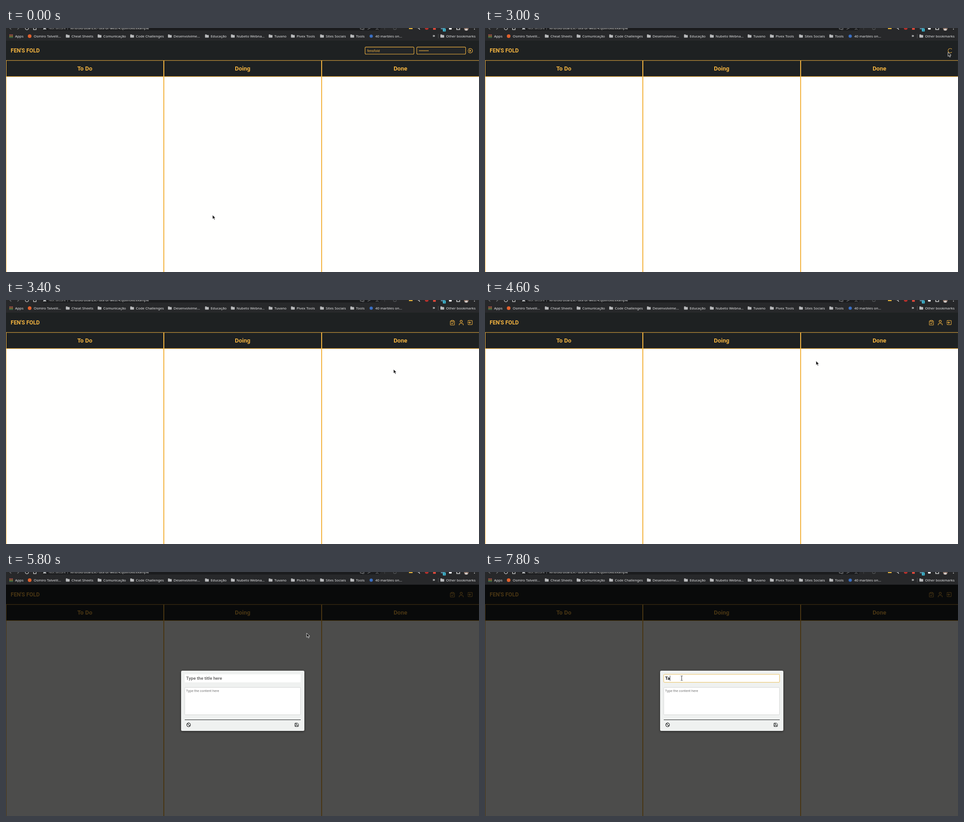
These frames come from a looping animation (1040 by 539 pixels, 8000 ms). An HTML page:

```html
<!DOCTYPE html>
<html lang="en">
<head>
<meta charset="utf-8">
<title>Task board</title>
<style>
html, body { margin: 0; width: 100%; height: 100%; overflow: hidden; background: #fff; }
svg { display: block; width: 100vw; height: 100vh; }
text { font-family: Roboto, sans-serif; white-space: pre; }
.bar text { font: 7.85px "Noto Sans", sans-serif; fill: #e6e7e8; }
.bar .url { font-size: 7.35px; }
.head { font-weight: 700; font-size: 13px; fill: #f2b340; }
.line { fill: none; stroke: #f2b340; stroke-width: 1.08; stroke-linecap: round; stroke-linejoin: round; }
.ink { fill: none; stroke: #1c1e1f; stroke-width: 1; stroke-linejoin: round; }
</style>
</head>
<body>
<svg id="stage" viewBox="0 0 1040 539"></svg>
<script>
const LOOP = 8000, STEP = 200;
const GOLD = '#f2b340', DARK = '#1e2122';
const stage = document.getElementById('stage');

const rect = (x, y, w, h, fill, extra = '') =>
  `<rect x="${x}" y="${y}" width="${w}" height="${h}" fill="${fill}" ${extra}/>`;
const dot = (x, y, r, fill) => `<circle cx="${x}" cy="${y}" r="${r}" fill="${fill}"/>`;
const text = (x, y, s, extra = '') => `<text x="${x}" y="${y}" ${extra}>${s}</text>`;
const path = (d, extra = '') => `<path d="${d}" ${extra}/>`;
const group = (id, body, extra = '') => `<g id="${id}" ${extra}>${body}</g>`;

// Arc around a centre, angles in degrees
function arc(cx, cy, r, from, to) {
  const at = a => `${cx + r * Math.cos(a * Math.PI / 180)} ${cy + r * Math.sin(a * Math.PI / 180)}`;
  return `M${at(from)}A${r} ${r} 0 ${to - from > 180 ? 1 : 0} 1 ${at(to)}`;
}

const folder = x => path(`M${x} 15.2q0-.9.9-.9h2.3l1 1.1h3.3q.8 0 .8.8v4.2q0 .8-.8.8h-6.7q-.8 0-.8-.8z`, 'fill="#b9babc"');

function browserBar() {
  const folders = [
    [144, 'Cheat Sheets'], [214, 'Comunicação'], [285.5, 'Code Challenges'],
    [368.5, 'Desenvolvime…'], [450, 'Educação'], [507, 'Nubeto Webna…'],
    [590, 'Tuvano'], [639, 'Pivex Tools'], [703, 'Sites Sociais'],
    [769.5, 'Tools'], [967.5, 'Other bookmarks']
  ];
  const colors = ['#e06055', '#e8b33f', '#58a55c'];
  let s = rect(0, 0, 1040, 28, '#27282a');
  s += rect(78, -10, 746, 15.5, '#1b1c1e', 'rx="7"');
  s += `<g fill="none" stroke="#d4d5d6" stroke-width="1.2">
    <path d="M8 0l3.5 3.3M25 3.3L28.5 0" stroke="#77797b"/>
    <path d="${arc(46, .2, 3.7, 0, 180)}M60.5-1v4.7h5.8V-1"/>
    <path d="M779-1v3.5h5M784 0h3v3.5h-4M795 3l7-3.5M813 3.5l3-1.8 3 1.8" stroke="#8b8d90" stroke-width="1"/>
    <path d="${arc(855, 0, 3.5, 10, 170)}" stroke="#55585a"/>
    <path d="M904 0l2-1 4 4.5M991-2v5.5h6.5V-2" stroke-width="1.5"/></g>`;
  s += path('M81 3.2L85-4l4 7.2z', 'fill="#b0b2b4"') + rect(135, 0, .8, 4, '#77797b');
  s += text(94, 3, 'Not secure', 'class="url" style="fill:#a6a8aa"');
  s += text(141, 3, 'fensfold-board.k7-site-br-west-4.quilnova.example', 'class="url"');
  s += rect(832, 0, .8, 4, '#4b4d50') + rect(886, -2, 8, 4.4, '#e3b13b') + dot(925, 0, 4, '#b3302c');
  s += rect(939, -2, 6, 6, '#d9483a') + rect(956, -2, 8, 5, '#53788d') + rect(960.5, 1, 6.5, 6.7, '#3fb6cf', 'rx="1"');
  s += text(962.6, 6.6, '1', 'style="font-size:5.5px;fill:#123"');
  s += rect(974, -2, 6, 5.5, '#eee', 'rx="1"') + dot(1012, 1, 5, '#8d7468') + path('M1008 4q4-5 8 0q-4 3-8 0z', 'fill="#d8d4d2"') + dot(1030, 2.6, 1, '#ddd');
  for (let i = 0; i < 9; i++)
    s += rect(7.5 + i % 3 * 2.8, 14.2 + (i / 3 | 0) * 2.8, 1.8, 1.8, colors[i / 3 | 0]);
  s += text(20, 20.5, 'Apps') + dot(52, 18, 4, '#e2612d') + text(61, 20.5, 'Osmiro Talvelil…');
  for (const [x, name] of folders) s += folder(x - 12.4) + text(x, 20.5, name);
  s += dot(803, 18, 3.6, '#3a6fc4') + text(812, 20.5, '40 marbles on…');
  s += text(938, 20.4, '»', 'style="font-weight:700;font-size:9px"') + rect(950, 13, .8, 10, '#55575a');
  return group('bar', s, 'class="bar"');
}

function board() {
  let s = rect(0, 28, 1040, 80, DARK) + text(10.3, 53.8, 'FEN\'S FOLD', 'class="head" style="font-size:12.1px"');
  ['To Do', 'Doing', 'Done'].forEach((name, i) => {
    const x = i * 347;
    s += rect(x + .5, 71.7, 346, 480, 'none', 'class="line"');
    s += path(`M${x} 107.4h347`, 'class="line"');
    s += text(x + 173.2, 94, name, 'class="head" text-anchor="middle"');
  });
  return s;
}

function loginForm() {
  let s = rect(789.5, 42.1, 107.5, 15.7, '#222527', 'class="line" rx="2" style="fill:#222527"');
  s += rect(903.1, 42.1, 107.5, 15.7, '#222527', 'class="line" rx="2" style="fill:#222527"');
  s += text(794, 52.6, 'fensfold', `font-size="7.6" fill="${GOLD}"`);
  for (let i = 0; i < 8; i++) s += dot(909.2 + i * 2.7, 50.2, 1.05, GOLD);
  s += path(arc(1020.8, 50.2, 4.9, -150, 150) + 'M1015.3 50.2h6.5M1019.6 47.9l2.3 2.3-2.3 2.3', 'class="line"');
  return group('login', s);
}

const userMenu = () => group('menu', path(
  'M979 46.2h-1.2q-.8 0-.8.8v7.5q0 .8.8.8h7.4q.8 0 .8-.8V47q0-.8-.8-.8H984' +
  'M979.3 45h4.4v2.2h-4.4zM979.4 51l1.6 1.6 2.8-2.9' +
  'M996.4 55.3v-.9q0-2.7 3-2.7h3q3 0 3 2.7v.9' +
  'M1016 47.6v-1.4q0-.9.9-.9h7.3q.9 0 .9.9v7.4q0 .9-.9.9h-7.3q-.9 0-.9-.9v-1.4' +
  'M1015 49.9h6.3M1019.2 47.8l2.1 2.1-2.1 2.1', 'class="line"') +
  '<circle cx="1000.9" cy="47.3" r="2.4" class="line"/>');

function loader() {
  const ring = (r, turn, color) => path(
    arc(520.3, 284.6, r, turn, turn + 90) + arc(520.3, 284.6, r, turn + 180, turn + 270),
    `fill="none" stroke="${color}" stroke-width="6.4" stroke-linecap="round"`);
  return group('loader', ring(28.4, -82, GOLD) + ring(20.6, -6, '#222324'));
}

function dialog() {
  let s = rect(385, 218, 271, 133, '#eff1f0', 'rx="3" filter="url(#shade)"');
  s += rect(393, 226, 254.7, 17.7, '#fff', 'id="field" rx="1.5"');
  s += rect(393, 255, 254.7, 60.4, '#fff', 'rx="1.5" stroke="#cfd1d0" stroke-width=".9"');
  s += text(396, 238.3, '', 'id="title" font-size="9.75" font-weight="700"');
  s += rect(396, 229, .8, 11.5, '#111', 'id="caret"');
  s += text(395.8, 264.8, 'Type the content here', 'font-size="7.58" fill="#757575"');
  s += path('M393 326.5h255', 'class="ink"');
  s += path(arc(401.5, 337.6, 4.1, 0, 359.9) + 'zM398.6 334.7l5.8 5.8', 'class="ink" style="stroke-width:1.15"');
  s += path('M635.2 334.6q0-.8.8-.8h5l2 2v4.8q0 .8-.8.8H636q-.8 0-.8-.8zM637 341.2v-3h4.2v3M637 334v1.9h3', 'class="ink"');
  return group('dialog', s);
}

const pointers =
  path('M0 0v9.2l2.2-1.9 1.6 3.5 1.7-.8-1.6-3.3h3z', 'id="arrow" fill="#151515" stroke="#fff" stroke-width=".8" stroke-linejoin="round"') +
  path('M0 .6q1-1.2 1.8.2v3.4l4 .7q1 .3.9 1.4l-.6 3.9H1.7L-1 6.6q0-1.2 1-.8z', 'id="hand" fill="#fff" stroke="#222" stroke-width=".6" stroke-linejoin="round"') +
  path('M-2-5h1.4L0-4.4.6-5H2M0-4.4v8.8M-2 5h1.4L0 4.4.6 5H2', 'id="beam" fill="none" stroke="#222" stroke-width=".9"');

stage.innerHTML = `<defs><filter id="shade" x="-10%" y="-10%" width="120%" height="125%">
  <feDropShadow dx="0" dy="1.5" stdDeviation="2.5" flood-opacity=".5"/></filter></defs>` +
  rect(0, 0, 1040, 539, '#fffffe') + board() + loginForm() + userMenu() +
  path(arc(1022.9, 50, 4.7, 48, 312), 'id="spinner" class="line"') +
  rect(0, 28, 1040, 511, '#000', 'id="dim"') + browserBar() + loader() + dialog() + group('pointer', pointers);

const el = {};
stage.querySelectorAll('[id]').forEach(n => el[n.id] = n);
const show = (id, on) => el[id].style.display = on ? '' : 'none';

// Pointer stops: time, x, y
const route = [
  [0, 454, 413], [200, 454, 413], [1200, 1029, 57], [1400, 1017, 50], [1600, 1014, 50],
  [1800, 978, 50], [2200, 1018, 53.5], [3200, 1018, 53.5], [3400, 852, 153], [3600, 640, 205],
  [4000, 196, 266], [4200, 190, 262], [4800, 916, 90], [5400, 980, 49], [5600, 981.5, 48.5],
  [5800, 661, 135], [6000, 530, 217], [6200, 445, 258], [6400, 432.5, 234.5], [LOOP, 432.5, 234.5]
];

function pointerAt(t) {
  const i = route.findIndex(p => p[0] > t), a = route[i - 1], b = route[i];
  const u = (t - a[0]) / (b[0] - a[0]), k = u * u * (3 - 2 * u);
  return [a[1] + (b[1] - a[1]) * k, a[2] + (b[2] - a[2]) * k];
}

function pointerKind(t, x) {
  if (t >= 6200 || (t >= 1600 && t < 2200 && x < 1010)) return 'beam';
  const onButton = (t >= 1400 && t < 2600) || (t >= 5400 && t < 5800);
  return onButton ? 'hand' : 'arrow';
}

function draw(now) {
  const t = Math.floor(now % LOOP / STEP) * STEP;
  const open = t >= 5800, loading = t === 3200, focused = t >= 6600;
  show('login', t < 2600);
  show('spinner', t >= 2600 && t < 3200);
  show('menu', t >= 3200);
  show('loader', loading);
  show('dialog', open);
  el.dim.setAttribute('opacity', open ? .7 : loading ? .5 : 0);
  el.spinner.setAttribute('transform', `rotate(${(t - 3000) * .36} 1022.9 50)`);

  const typed = 'Ta'.slice(0, Math.max(0, (t - 7400) / STEP));
  el.title.textContent = typed || 'Type the title here';
  el.title.setAttribute('fill', typed ? '#111' : '#6f6f6f');
  el.field.setAttribute('stroke', focused ? '#e9bd55' : 'none');
  show('caret', focused && (t < 7200 || typed));
  el.caret.setAttribute('x', 396 + (typed ? el.title.getComputedTextLength() : 0));

  const [x, y] = pointerAt(t), kind = pointerKind(t, x);
  el.pointer.setAttribute('transform', `translate(${x} ${y})`);
  for (const id of ['arrow', 'hand', 'beam']) show(id, id === kind);
}

const start = performance.now();
function tick() {
  draw(performance.now() - start);
  requestAnimationFrame(tick);
}
tick();
</script>
</body>
</html>
```
